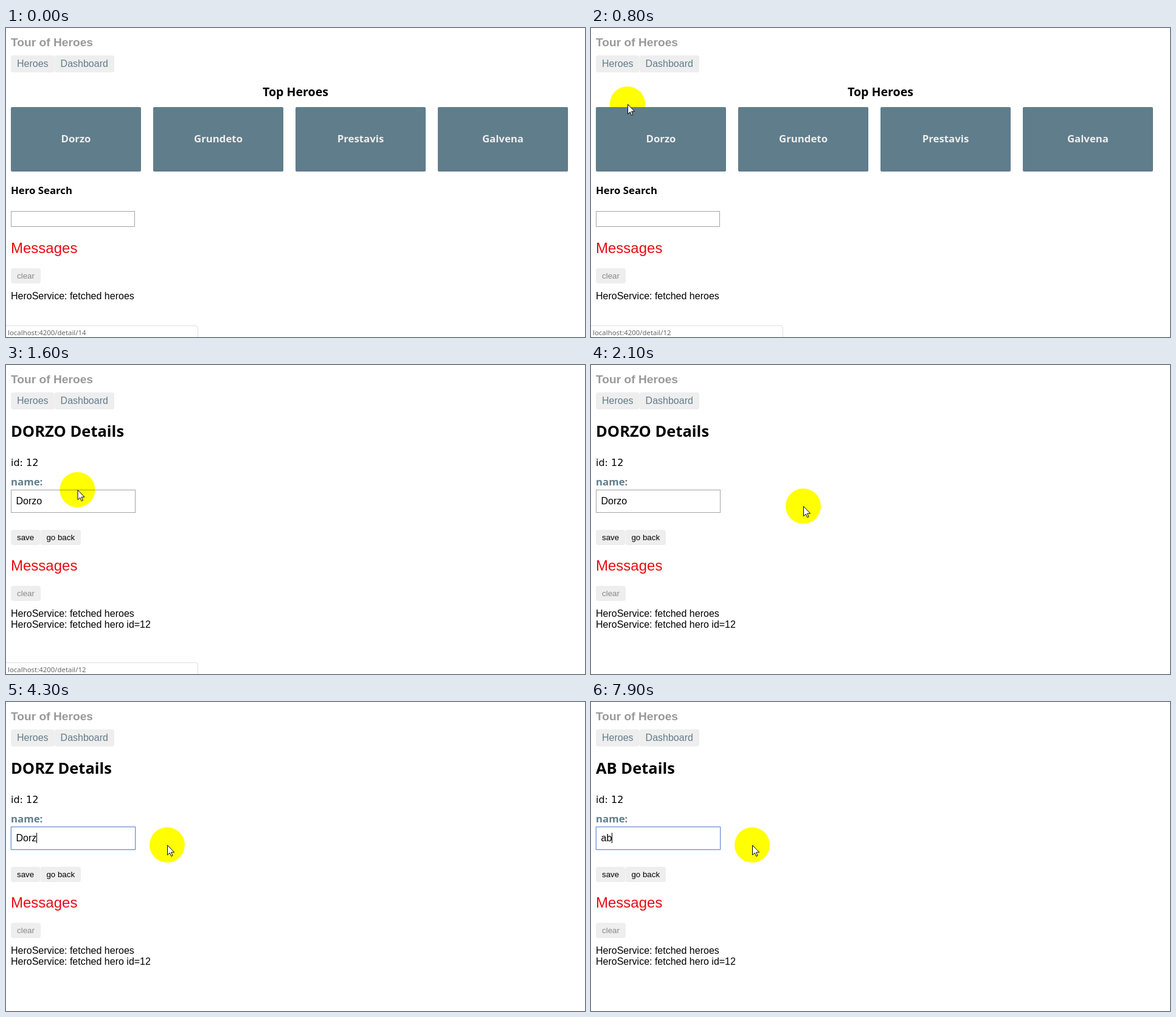
An HTML page for the animation above (8 s loop, 952 by 508 pixels).

```html
<!DOCTYPE html>
<html lang="en">
<head>
<meta charset="utf-8">
<title>Tour of Heroes</title>
<style>
  html, body { margin: 0; width: 100%; height: 100%; overflow: hidden; background: #fff; }
  svg { display: block; width: 952px; height: 508px; }
  text { font: 16px "Liberation Sans", Arial, sans-serif; fill: #000; white-space: pre; }
  .app { font-weight: bold; font-size: 19.2px; fill: #999; }
  .link { fill: #607d8b; }
  .head { font: bold 16.8px "Noto Sans", sans-serif; }
  .mid { text-anchor: middle; }
  .red { font-size: 24px; fill: #ea0a12; }
  .btn { font-size: 13.33px; }
  .off { fill: #888; }
  .id { font: 16px "DejaVu Sans", sans-serif; }
  .url { font: 11.4px "Noto Sans", sans-serif; fill: #666; }
  .glow { mix-blend-mode: multiply; }
</style>
</head>
<body>
<svg id="stage" viewBox="0 0 952 508" xmlns="http://www.w3.org/2000/svg"></svg>
<script>
const LOOP = 8000, STEP = 100;
const stage = document.getElementById('stage');
const heroes = ['Dorzo', 'Grundeto', 'Prestavis', 'Galvena'];

function add(parent, tag, attrs, content) {
  const el = document.createElementNS('http://www.w3.org/2000/svg', tag);
  for (const k in attrs) el.setAttribute(k, attrs[k]);
  if (content !== undefined) el.textContent = content;
  parent.appendChild(el);
  return el;
}
const group = () => add(stage, 'g', {});
const box = (p, x, y, width, height, rx, fill) =>
  add(p, 'rect', { x, y, width, height, rx, fill });
const frame = (p, x, y, width, height, stroke) =>
  add(p, 'rect', { x: x + .5, y: y + .5, width: width - 1, height: height - 1, fill: '#fff', stroke });
const label = (p, cls, x, y, str) => add(p, 'text', { class: cls, x, y }, str);
function button(p, x, y, w, str, cls = '') {
  box(p, x, y, w, 25, 4, '#eee');
  label(p, 'btn ' + cls, x + 10, y + 17, str);
}
function messages(p, y, lines) {
  label(p, 'red', 8, y, 'Messages');
  button(p, 8, y + 25, 49, 'clear', 'off');
  lines.forEach((s, i) => label(p, '', 8, y + 76 + i * 18, 'HeroService: ' + s));
}
const show = (el, on) => el.setAttribute('visibility', on ? 'visible' : 'hidden');

// Shared header
const header = group();
box(header, 0, 0, 952, 508, 0, '#fff');
label(header, 'app', 8, 30, 'Tour of Heroes');
box(header, 8, 45, 71.6, 28, 4, '#eee');
box(header, 79.6, 45, 98.4, 28, 4, '#eee');
label(header, 'link', 18, 64, 'Heroes');
label(header, 'link', 89.6, 64, 'Dashboard');

// Dashboard page
const dash = group();
label(dash, 'head mid', 476, 112, 'Top Heroes').style.fontSize = '19.6px';
const cards = heroes.map((name, i) => {
  const x = 8 + 234 * i;
  return {
    rect: box(dash, x, 130, 214, 106, 2, '#607d8b'),
    text: label(dash, 'head mid', x + 107, 188, name)
  };
});
label(dash, 'head', 8, 273, 'Hero Search');
frame(dash, 8, 301, 204, 26, '#a4a4a4');
messages(dash, 370, ['fetched heroes']);

// Detail page
const detail = group();
const title = label(detail, 'head', 8, 118, '');
title.style.fontSize = '25.5px';
label(detail, 'id', 8, 166, 'id: 12');
label(detail, 'head link', 8, 198, 'name:');
const ring = box(detail, 7.5, 204.5, 206, 39, 1, '#a3bef0');
const field = frame(detail, 8, 205, 205, 38, '#a4a4a4');
const value = label(detail, '', 16.5, 229, '');
const caret = box(detail, 0, 215, 1, 17, 0, '#000');
button(detail, 8, 271, 48.2, 'save');
button(detail, 56.4, 271, 66.6, 'go back');
messages(detail, 338, ['fetched heroes', 'fetched hero id=12']);

// Link status bar
const status = group();
add(status, 'path', { d: 'M-1 489.5H312Q315.5 489.5 315.5 493V509H-1Z', fill: '#fff', stroke: '#dedede' });
const url = label(status, 'url', 3, 505, '');

// Pointer
const glow = add(stage, 'path', { class: 'glow', fill: '#ff0' });
const pointer = group();
const press = add(pointer, 'circle', { cx: 0, cy: -.5, r: 6, fill: 'none', stroke: '#ec1020', 'stroke-width': 4 });
const skin = { fill: '#fff', stroke: '#000', 'stroke-linejoin': 'round' };
const arrow = add(pointer, 'path', { ...skin,
  d: 'M.5.5V16.5L4.2 13L6.7 18.6L9 17.6L6.6 12.1H11.6Z' });
const hand = add(pointer, 'path', { ...skin,
  d: 'M0 13V1.8Q0 .5 1.4 .5T2.8 1.8V7.5Q4.3 6.3 5.6 7.9Q7.2 7 8.3 8.6Q10 8 11.3 10V16' +
     'Q11 18.5 9.5 20V22.5H1V20Q-2 17-4.5 13.2Q-5 11-3 11Z' });
const fingers = add(pointer, 'path', { d: 'M2.8 7V12M5.6 8V12M8.4 9V12.5', stroke: '#000', fill: 'none' });

const path = [
  [100, 270, 342], [200, 165, 234], [300, 92, 158], [400, 46, 107], [500, 46, 70],
  [600, 48, 63], [700, 50, 78], [800, 60, 125], [900, 74, 178], [1000, 81, 195],
  [1200, 85, 201.5], [1500, 85, 202], [1700, 150, 208], [2000, 335, 230], [2100, 349, 232],
  [2600, 349, 232], [2800, 255, 224], [3000, 150, 217], [3100, 150, 220],
  [3300, 195, 259], [3500, 258, 238], [3700, 265, 235]
];
const typed = [
  [0, heroes[0]], [4300, heroes[0].slice(0, 4)], [4500, heroes[0].slice(0, 3)],
  [4600, heroes[0].slice(0, 2)], [4700, heroes[0][0]], [4900, ''], [6300, 'a'], [6800, 'ab']
];
const blink = [[0, 0], [3100, 1], [3600, 0], [4100, 1], [4900, 0], [5200, 1], [5700, 0],
  [6300, 1], [7400, 0], [7900, 1]];

const latest = (list, t) => list.filter(k => k[0] <= t).pop()[1];
function pointerAt(t) {
  const i = path.findIndex(k => k[0] > t);
  if (i < 0) return path[path.length - 1].slice(1);
  if (i === 0) return path[0].slice(1);
  const [a, ax, ay] = path[i - 1], [b, bx, by] = path[i], f = (t - a) / (b - a);
  return [ax + (bx - ax) * f, ay + (by - ay) * f];
}

// Spotlight disc; an idle card row covers the part below floor
function disc(x, y, floor) {
  const r = 29, d = floor - y;
  if (d >= r) return `M${x - r} ${y}a${r} ${r} 0 1 1 ${2 * r} 0a${r} ${r} 0 1 1 ${-2 * r} 0Z`;
  const half = Math.sqrt(r * r - d * d);
  return `M${x - half} ${floor}A${r} ${r} 0 ${d > 0 ? 1 : 0} 1 ${x + half} ${floor}Z`;
}

function draw(t) {
  const onDash = t < 1500, live = t >= 100;
  const [x, y] = pointerAt(t);
  const over = live && onDash && x >= 8 && x < 222 && y >= 130 && y < 236;

  show(dash, onDash);
  show(detail, !onDash);
  cards.forEach((c, i) => {
    const hot = over && i === 0;
    c.rect.setAttribute('fill', hot ? '#eee' : '#607d8b');
    c.text.style.fill = hot ? '#607d8b' : '#eee';
  });

  show(status, t < 1700);
  url.textContent = 'localhost:4200/detail/' + (t < 200 ? 14 : 12);

  const name = latest(typed, t), focus = t >= 3100;
  title.textContent = (name.toUpperCase() + ' Details').trim();
  value.textContent = name || 'name';
  value.style.fill = name ? '#000' : '#757575';
  show(ring, !onDash && focus);
  field.setAttribute('stroke', focus ? '#7092d6' : '#a4a4a4');
  caret.setAttribute('x', Math.floor(16.5 + (name ? value.getComputedTextLength() : 0)));
  show(caret, !onDash && latest(blink, t));

  show(glow, live);
  glow.setAttribute('d', disc(x, y, onDash && y < 130 ? 130 : 999));
  pointer.setAttribute('transform', `translate(${x} ${y})`);
  show(arrow, live && !over);
  show(hand, over);
  show(fingers, over);
  show(press, (t >= 1200 && t < 1500) || t === 3100);
}

let start;
function tick(now) {
  if (start === undefined) start = now;
  const t = (now - start) % LOOP;
  draw(Math.floor(t / STEP) * STEP);
  requestAnimationFrame(tick);
}
draw(0);
requestAnimationFrame(tick);
</script>
</body>
</html>
```
